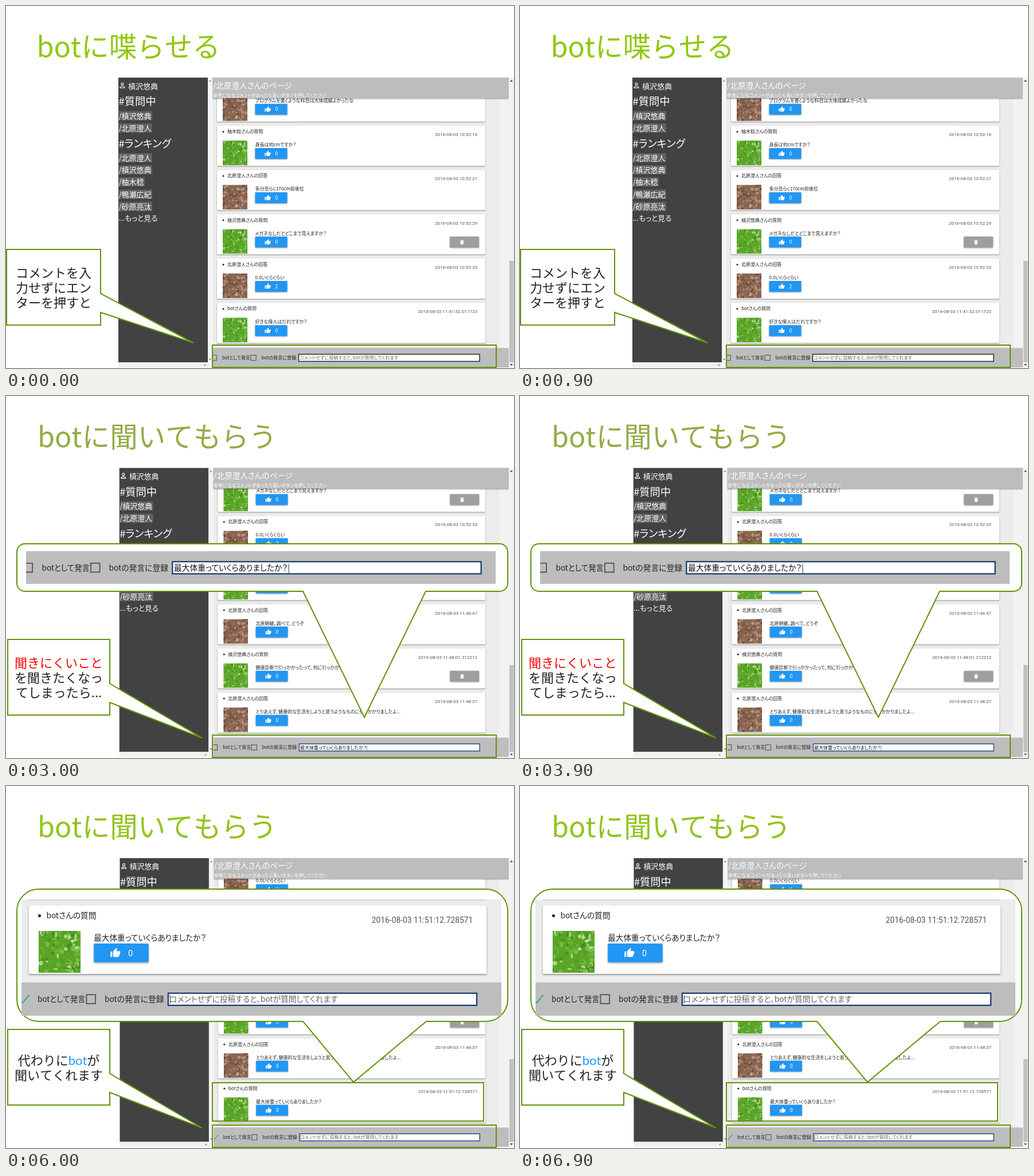
Recreate the animation shown at these times as an HTML page. Size 886x632 px, loop 7500 ms.

```html
<!DOCTYPE html>
<html lang="ja">
<head>
<meta charset="utf-8">
<style>
html, body { margin: 0; width: 100%; height: 100%; overflow: hidden; background: #fff; }
#stage { display: block; }
text { font-family: "Noto Sans CJK JP", "Noto Sans CJK", sans-serif; font-feature-settings: "palt"; white-space: pre; }
.wide { font-feature-settings: normal; font-kerning: none; }
.num { font-family: Roboto, sans-serif; }
.bot { font-family: Lato, sans-serif; fill: #2196f3; }
.lift { filter: drop-shadow(0 1px 1px #0006); }
.line { fill: none; stroke: #5f9408; stroke-width: 2; }
.bubble { fill: #fff; stroke: #5f9408; stroke-width: 2; }
</style>
</head>
<body>
<svg id="stage" width="886" height="632" viewBox="0 0 886 632"></svg>
<script>
const STEP = 1500, ZOOM = 1.706;
const ME = '槙沢悠典', HOST = '北原澄人', OTHER = '柚木稔';
const HINT = 'コメントせずに投稿すると、botが質問してくれます';
const ASK = '最大体重っていくらありましたか？';

const rect = (x, y, w, h, fill, more = '') =>
  `<rect x="${x}" y="${y}" width="${w}" height="${h}" fill="${fill}" ${more}/>`;
const path = (d, fill, more = '') => `<path d="${d}" fill="${fill}" ${more}/>`;
const text = (x, y, size, str, fill, more = '') =>
  `<text x="${x}" y="${y}" font-size="${size}" fill="${fill}" ${more}>${str}</text>`;
const frame = ([x, y, w, h]) => rect(x, y, w, h, 'none', 'class="line"');

// Soft mottled stand-ins for the two avatar photographs
let seed = 7;
const rnd = () => (seed = seed * 16807 % 2147483647) / 2147483647;
function avatar(id, base, tones) {
  let s = rect(0, 0, 43, 43, base);
  for (let i = 0; i < 110; i++)
    s += `<ellipse cx="${rnd() * 43}" cy="${rnd() * 43}" rx="${.8 + rnd() * 2}" ry="${.8 + rnd() * 2}" fill="${tones[i % tones.length]}" opacity=".7"/>`;
  return `<symbol id="${id}" viewBox="0 0 43 43">${s}</symbol>`;
}
const defs = avatar('leaf', '#5aa528', ['#3c8a14', '#86c454', '#4c9a1c', '#d2ecb8', '#74b83c'])
  + avatar('soil', '#8a6650', ['#5a4038', '#b8947c', '#9a705c', '#6d4c40', '#c8a894']);

const THUMB = 'M1 21h4V9H1v12zm22-11c0-1.1-.9-2-2-2h-6.3l1-4.6v-.3c0-.4-.2-.8-.5-1.1L14.2 1 7.6 7.6C7.2 8 7 8.5 7 9v10c0 1.1.9 2 2 2h9c.8 0 1.5-.5 1.8-1.2l3-7c.1-.3.2-.5.2-.8z';
const TRASH = 'M6 19c0 1.1.9 2 2 2h8c1.1 0 2-.9 2-2V7H6zM19 4h-3.5l-1-1h-5l-1 1H5v2h14z';

// who, text, time, likes, removable
const posts = [
  [HOST, 'プログラムを書くような科目は大体成績よかったな', '10:52:10'],
  [OTHER, '身長は何cmですか？', '10:52:16'],
  [HOST, '多分恐らく170cm前後位', '10:52:21'],
  [ME, 'メガネなしだとどこまで見えますか？', '10:52:29', 0, true],
  [HOST, '0.0いくらくらい', '10:52:33', 2],
  ['bot', '好きな偉人はだれですか？', '11:41:32.011723'],
  [HOST, '北原朝継。調べて、どうぞ', '11:46:47'],
  [ME, '健康診断で引っかかったって、何に引っかかったの？', '11:48:01.212212', 0, true],
  [HOST, 'とりあえず、健康的な生活をしようと思うようなものに引っかかりましたよ...', '11:48:37'],
  ['bot', ASK, '11:51:12.728571']
];

function card([who, body, time, likes = 0, removable], row) {
  const host = who === HOST;
  let s = rect(368, 0, 468, 70, '#fff', 'rx="1" class="lift"')
    + '<circle cx="379" cy="10.5" r="1.5" fill="#222"/>'
    + text(386, 13, 8, `${who}さんの${host ? '回答' : '質問'}`, '#222')
    + text(822, 18, 8.1, '2016-08-03 ' + time, '#555', 'class="num" text-anchor="end"')
    + `<use href="#${host ? 'soil' : 'leaf'}" x="378" y="26" width="43" height="43"/>`
    + text(434.5, 36, 8, body, '#222')
    + rect(434.5, 39, 56, 19, '#2196f3', 'rx="1" class="lift"')
    + path(THUMB, '#fff', 'transform="translate(451 43) scale(.46)"')
    + text(469.5, 51.7, 8.5, likes, '#fff', 'class="num"');
  if (removable) s += rect(774, 39, 51, 19, '#9e9e9e', 'rx="1" class="lift"')
    + path(TRASH, '#fff', 'transform="translate(790 43.5) scale(.44)"');
  return `<g transform="translate(0 ${131.7 + 77.3 * row})">${s}</g>`;
}

function footer({ typed, checked, focus }) {
  const pen = 'stroke="#555" stroke-width="1.1"';
  return rect(360, 597, 517, 34, '#bdbdbd')
    + (checked ? path('M360.8 617l1 .8 6.6-8', 'none', 'stroke="#26a69a" stroke-width="1.1"')
      : path('M360 609.5h7.3v9.2H360', 'none', pen))
    + text(377, 617, 7.9, 'botとして発言', '#222')
    + rect(427, 609.5, 9.2, 9.2, 'none', pen)
    + text(445.5, 617, 8.1, 'botの発言に登録', '#222')
    + rect(510.5, 608, 315.5, 12.4, '#fff', `stroke="${focus ? '#17386f' : '#111'}" stroke-width="1.3"`)
    + text(512, 617.2, 8.1, typed ? typed + (focus ? '|' : '') : HINT, typed ? '#111' : '#666', typed ? '' : 'font-weight="500"')
    + (focus && !typed ? path('M512.5 610v8.5', 'none', 'stroke="#222" stroke-width=".6"') : '');
}

const feed = sc => rect(360, 125, 500, 506, '#ececec') + rect(860, 125, 17, 506, '#f2f2f2')
  + posts.slice(sc.from, sc.from + 6).map(card).join('') + footer(sc);

function sidebar() {
  const names = [[ME, 191.5], [HOST, 213], [HOST, 265], [ME, 286], [OTHER, 307], ['鴨瀬広紀', 328.5], ['砂原亮汰', 350]];
  return rect(196, 125, 156, 497, '#424242')
    + path('M199 143v-1.2q4-3 8 0v1.2z', 'none', 'stroke="#fff" stroke-width="1.1"')
    + '<circle cx="203" cy="136.3" r="2" fill="none" stroke="#fff" stroke-width="1.1"/>'
    + text(213, 144.5, 13, ME, '#fff', 'font-weight="500"')
    + text(196.5, 173, 18.3, '#質問中', '#fff')
    + text(196.5, 246.5, 18.3, '#ランキング', '#fff')
    + names.map(([n, y]) => rect(197, y - 8, 6 + 13 * n.length, 16, '#616161')
      + text(196.5, y + 5, 13, '/' + n, '#fff', 'font-weight="500"')).join('')
    + text(196.5, 375, 12.7, '...もっと見る', '#fff', 'font-weight="500"');
}

const screen = sc => sidebar() + feed(sc)
  + rect(360, 125, 517, 36, '#bdbdbd', 'class="lift"')
  + text(361, 143.5, 13.6, `/${HOST}さんのページ`, '#fff', 'font-weight="500"')
  + text(361, 158.5, 8, '参考になるコメントがあったら青いボタンを押してください', '#fff')
  + rect(352, 125, 8, 506, '#f4f4f4') + rect(196, 622, 156, 9, '#f1f1f1')
  + rect(877, 125, 9, 506, '#f1f1f1') + rect(878, sc.thumb, 7.5, 622 - sc.thumb, '#c1c1c1')
  + path('M354 132l2-2.5 2 2.5zM354 616l2 2.5 2-2.5zM346 625l2.5 2-2.5 2z', '#777')
  + path('M879 132l2.5-3 2.5 3zM879 625l2.5 3 2.5-3z', '#444');

// Rounded box with a tail from its lower edge
function bubble([x, y, w, h, r], [left, tipX, tipY, right], more = 'class="bubble"') {
  const a = `a${r} ${r} 0 0 1 `;
  return path(`M${x + r} ${y}h${w - 2 * r}${a}${r} ${r}v${h - 2 * r}${a}${-r} ${r}H${right}L${tipX} ${tipY}L${left} ${y + h}H${x + r}${a}${-r} ${-r}v${2 * r - h}${a}${r} ${-r}z`, '#fff', more);
}

function magnifier(sc) {
  const { box, tail, crop: [x, y, w, h], at } = sc.zoom;
  return bubble(box, tail) + `<svg x="${x}" y="${y}" width="${w}" height="${h}">
    <g transform="translate(${at[0] - x} ${at[1] - y}) scale(${ZOOM}) translate(-510 -597)">${feed(sc)}</g></svg>`;
}

function note({ edge: [l, r], tip, say }) {
  const top = 499.5 - 13 * (say.length - 1);
  return path(`M${l} 425H${r}V502L${tip}L${r} 535V557H${l}z`, '#fff', 'class="bubble"')
    + say.map((s, i) => text((l + r) / 2, top + 26.3 * i, 22, s, '#222', 'class="wide" text-anchor="middle"')).join('');
}

const tickBadge = () =>
  bubble([70, 174, 90, 63, 8], [85, 66, 275, 108], 'style="fill:#8fae40;stroke:#6a8a1f;stroke-width:2"')
  + path('M100 193h29v28h-29z', 'none', 'stroke="#fff" stroke-width="2.2"')
  + path('M101 208l4-3 6 7q8-13 20-21-11 12-18 27h-4z', '#fff');

const bot = '<tspan class="bot">bot</tspan>';
const bar = [360, 592, 495, 39];
const talk = { title: 'botに喋らせる', x: 53.5, color: '#8fc80a', scale: 1, from: 0, thumb: 445, edge: [1, 165], rects: [bar] };
const ask = { title: 'botに聞いてもらう', x: 55, scale: .9964, from: 3, thumb: 470, edge: [3, 181], tip: '342 597', rects: [bar] };
const askZoom = (crop, at) => ({ box: [19, 258, 856, 83, 14], tail: [518, 625, 561, 732], crop, at });
const reply = [`代わりに${bot}が`, '聞いてくれます'];

const scenes = [
  { ...talk, tip: '327 588', say: ['コメントを入', '力せずにエン', 'ターを押すと'] },
  { ...talk, tip: '351 560', say: [`${bot}を受動的`, 'に動かすこと', 'ができます'],
    rects: [[361, 516, 480, 76], bar],
    zoom: { box: [6, 147, 870, 222, 37], tail: [514, 642, 500, 731], crop: [25, 161, 839, 199], at: [280.5, 302] } },
  { ...ask, color: '#93ac45', scale: .9975, typed: ASK, focus: true,
    say: ['<tspan fill="#f00">聞きにくいこと</tspan>', 'を聞きたくなっ', 'てしまったら...'],
    zoom: askZoom([35, 271, 819, 57], [289.5, 270.5]) },
  { ...ask, color: '#8fad41', typed: ASK, checked: true, say: reply, badge: true,
    zoom: askZoom([28, 271, 834, 58], [283, 271]) },
  { ...ask, color: '#91c41c', from: 4, thumb: 477, checked: true, focus: true, say: reply,
    rects: [[360, 518, 473, 67], bar],
    zoom: { box: [19, 180, 856, 231, 38], tail: [518, 606, 517, 733], crop: [27, 198, 837, 203], at: [282, 343] } }
];

const draw = sc => '<g display="none">'
  + text(sc.x, 89, 48.5, sc.title, sc.color, 'class="wide" font-weight="300"')
  + `<g transform="translate(886 378) scale(${sc.scale}) translate(-886 -378)">${screen(sc)}</g>`
  + sc.rects.map(frame).join('')
  + (sc.zoom ? magnifier(sc) : '') + note(sc) + (sc.badge ? tickBadge() : '') + '</g>';

const stage = document.getElementById('stage');
stage.innerHTML = `<defs>${defs}</defs>` + scenes.map(draw).join('');
const slides = [...stage.children].slice(1);

function tick() {
  const now = Math.floor(performance.now() / STEP) % slides.length;
  slides.forEach((g, i) => g.setAttribute('display', i === now ? 'inline' : 'none'));
  requestAnimationFrame(tick);
}
tick();
</script>
</body>
</html>
```
